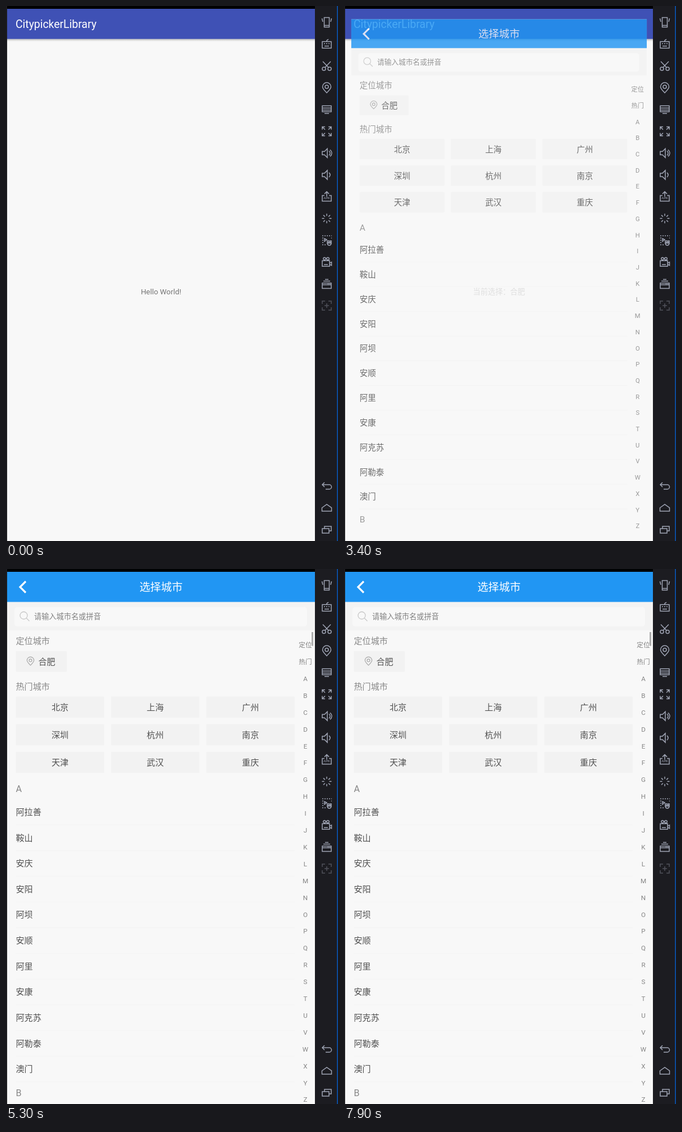
Animation, 590 px wide and 950 px high, one loop 8000 ms. Source, as an HTML page with a canvas:

```html
<!DOCTYPE html>
<html lang="zh-CN">
<head>
<meta charset="utf-8">
<title>CitypickerLibrary</title>
<style>
  html, body { margin: 0; width: 100%; height: 100%; overflow: hidden; background: #1c1c20; }
  canvas { display: block; }
</style>
</head>
<body>
<canvas id="stage" width="590" height="950"></canvas>
<script>
const LOOP = 8000, STEP = 100;
const SANS = "Roboto, 'Noto Sans CJK SC', 'Noto Sans CJK', sans-serif";
const SANS_CENTERED = "Roboto, 'Noto Sans CJK JP', 'Noto Sans CJK', sans-serif"; // centred full-width colon

const stage = document.getElementById('stage').getContext('2d');
const layerCanvas = Object.assign(document.createElement('canvas'), { width: 590, height: 950 });
const layer = layerCanvas.getContext('2d');

// Each entry: start time and how far the picker is open at every following step.
const transitions = [
  [0, [0]],
  [1700, [.3, .86, .99, 1]],
  [3400, [.8, .4, .1, 0]],
  [4800, [.06, .5, .86, .99, 1]],
  [6300, [.62, .22, .035]],
  [7500, [.5, .92, 1]]
];
const caretTimes = [[1700, 2200], [2600, 3100], [4800, 5300], [5800, 6300], [7500, 7900]];

const hotCities = ['北京', '上海', '广州', '深圳', '杭州', '南京', '天津', '武汉', '重庆'];
const cities = ['阿拉善', '鞍山', '安庆', '安阳', '阿坝', '安顺', '阿里', '安康', '阿克苏', '阿勒泰', '澳门'];
const indexLabels = ['定位', '热门', ...'ABCDEFGHIJKLMNOPQRSTUVWXYZ'];

const ring = (x, y, r) => `M${x - r} ${y}a${r} ${r} 0 1 0 ${2 * r} 0a${r} ${r} 0 1 0 ${-2 * r} 0`;
const pin = 'M0 9C-4 5-7.5 2-7.5-1.5A7.5 7.5 0 0 1 7.5-1.5C7.5 2 4 5 0 9z' + ring(0, -1.5, 3);
const speaker = 'M-8-3h4l5-5v16l-5-5h-4z M4-4q4 4 0 8';
const rays = Array.from({ length: 8 }, (_, i) => {
  const c = Math.cos(i * Math.PI / 4), s = Math.sin(i * Math.PI / 4);
  return `M${c * 4.5} ${s * 4.5}L${c * 8.5} ${s * 8.5}`;
}).join('');

const toolIcons = [
  'M-4.5-8.5h9v17h-9z M-4.5 5.5h9 M-8.5-7l1.5 6 M8.5-7l-1.5 6',
  'M-8-4.5h16v11.5h-16z M0-4.5v-2l3-2 M-5-1h2 M-1-1h2 M3-1h2 M-4 3.5h8',
  ring(-5, 5, 3) + ring(5, 5, 3) + 'M-3 2.5L7-8 M3 2.5L-7-8',
  pin,
  'M-8-6.5h16v10.5h-16z M-8-2.5h16 M-8 1h16 M-4 7h8',
  'M-8-3v-5h5 M-8-8l5 5 M8-3v-5h-5 M8-8l-5 5 M-8 3v5h5 M-8 8l5-5 M8 3v5h-5 M8 8l-5-5',
  speaker + 'M6-6q6 6 0 12',
  speaker,
  'M-4-2h-4v10h16v-10h-4 M0 0v-9 M-4-5l4-4 4 4',
  rays,
  'M-8-8h2m2 0h2m2 0h2m2 0h2m2 0h1 M-8-4h2 M-8 0h2 M-8 4h2 M-8 8h2m2 0h2 M8-4h1 M-4-3l4 2-4 3z M1 1h3v3h-3z M6 1h2v3h-2z M1 5h7v1q-1 3-3.5 3t-3.5-3z',
  ring(-4, -6, 2.2) + ring(2, -6, 2.2) + 'M-8-2.5h13v10h-13z M-5 4.5h7 M5 2l3.5-2v6l-3.5-2',
  'M-3-8h6 M-6-5h12 M-8-1.5h16v9.5h-16z M-8 1.5h16 M2 0h1 M5 0h1',
  'M-8-3v-5h5 M8-3v-5h-5 M-8 3v5h5 M8 3v5h-5 M0-4v8 M-4 0h8'
];
const navIcons = [
  'M-4-6l-4 4 4 4 M-8-2h12.5a4 4 0 0 1 0 8h-6.5',
  'M-8.5 0l8.5-6 8.5 6v6h-17z',
  'M-8-2h12v8h-12z M-4-2v-4h12v8h-4'
];

function box(ctx, x, y, w, h, color, radius = 0) {
  ctx.fillStyle = color;
  ctx.beginPath();
  ctx.roundRect(x, y, w, h, radius);
  ctx.fill();
}

// y is the vertical centre of the glyphs
function label(ctx, text, x, y, size, color, align = 'left', family = SANS) {
  ctx.font = `${size}px ${family}`;
  ctx.textAlign = align;
  ctx.fillStyle = color;
  ctx.fillText(text, x, y + size * .37);
}

function icon(ctx, path, x, y, color, width = 1.5, scale = 1) {
  ctx.save();
  ctx.translate(x, y);
  ctx.scale(scale, scale);
  ctx.strokeStyle = color;
  ctx.lineWidth = width;
  ctx.stroke(new Path2D(path));
  ctx.restore();
}

function drawSidebar(t) {
  const color = '#a0a5b5';
  box(stage, 549, 0, 39, 950, '#1c1c21');
  box(stage, 588, 0, 2, 950, '#0c4a9a');
  if (t >= 300 && t < 400) box(stage, 555, 130, 30, 30, '#34353d', 3);
  toolIcons.forEach((path, i) => icon(stage, path, 570, 29 + i * 38.7, i === 13 ? '#50525b' : color));
  label(stage, 'APK', 570, 341, 6, color, 'center');
  navIcons.forEach((path, i) => icon(stage, path, 570, 852 + i * 39, color));
}

function drawMain(t) {
  box(stage, 2, 5, 547, 945, '#f8f8f8');
  const shadow = stage.createLinearGradient(0, 58, 0, 63);
  shadow.addColorStop(0, 'rgba(0,0,0,.25)');
  shadow.addColorStop(1, 'rgba(0,0,0,0)');
  box(stage, 2, 58, 547, 5, shadow);
  box(stage, 2, 5, 547, 53.5, '#3f51b5');
  label(stage, 'CitypickerLibrary', 17, 32, 19.4, '#fff');
  if (t < 3400) label(stage, 'Hello World!', 275.5, 507, 13.3, '#757575', 'center');
  else label(stage, '当前选择：' + (t < 6300 ? '合肥' : '北京'), 275.5, 507, 13.2, '#757575', 'center', SANS_CENTERED);
}

function drawPicker(ctx, caretOn, scrollbarAlpha) {
  box(ctx, 2, 5, 547, 950, '#f8f8f8');
  box(ctx, 2, 58, 547, 51, '#f3f3f3');
  box(ctx, 2, 5, 547, 53.5, '#2196f3');
  icon(ctx, 'M5-10L-5 0 5 10', 30, 32, '#fff', 3.2);
  label(ctx, '选择城市', 275.5, 32, 19.2, '#fff', 'center');

  box(ctx, 15, 67.5, 520, 34.5, '#f8f8f8', 5);
  icon(ctx, ring(-1.5, -1.5, 6.5) + 'M3 3L8.5 8.5', 33, 84, '#c8c8c8', 1.3);
  label(ctx, '请输入城市名或拼音', 50, 84.5, 13.2, '#808080');
  if (caretOn) box(ctx, 50, 74, 2, 19, '#3a8ee8');

  label(ctx, '定位城市', 17.5, 127.5, 15.1, '#888');
  box(ctx, 17.5, 146, 90.5, 36.5, '#f2f2f2', 1);
  icon(ctx, pin, 43.5, 163.5, '#a5a5a5', 1.4, .82);
  label(ctx, '合肥', 57.5, 164.5, 15.1, '#555');

  label(ctx, '热门城市', 17.5, 208.5, 15.1, '#888');
  hotCities.forEach((city, i) => {
    const x = 17.5 + (i % 3) * 169.2, y = 226.5 + Math.floor(i / 3) * 49.1;
    box(ctx, x, y, 157, 37.5, '#f2f2f2', 1);
    label(ctx, city, x + 78.5, y + 19, 15.1, '#505050', 'center');
  });

  label(ctx, 'A', 17.5, 390, 16.2, '#888');
  cities.forEach((city, i) => {
    const y = 431.3 + i * 45.65;
    label(ctx, city, 17.5, y, 15.1, '#505050');
    box(ctx, 17.5, y + 22.5, 496, 1, '#f4f4f4');
  });
  label(ctx, 'B', 17.5, 930, 16.2, '#888');

  indexLabels.forEach((name, i) =>
    label(ctx, name, 532, 134.8 + i * 29.9, 11.7, '#858585', 'center'));
  box(ctx, 543, 112, 3, 24.5, `rgba(130,130,130,${.62 * scrollbarAlpha})`);
}

function drawPickerLayer(t, progress) {
  const scale = .8 + .2 * progress;
  const fadeStart = t < 3800 ? 2600 : t < 7000 ? 5800 : LOOP;
  const scrollbarAlpha = Math.min(1, Math.max(0, 1 - (t - fadeStart + STEP) / 400));
  const caretOn = caretTimes.some(([from, to]) => t >= from && t < to);

  layer.clearRect(0, 0, 590, 950);
  layer.save();
  layer.translate(275.5, 467);
  layer.scale(scale, scale);
  layer.translate(-275.5, -467);
  drawPicker(layer, caretOn, scrollbarAlpha);
  layer.restore();

  stage.save();
  stage.beginPath();
  stage.rect(2, 5, 547, 945);
  stage.clip();
  stage.globalAlpha = Math.min(1, progress * 1.02);
  stage.drawImage(layerCanvas, 0, 0);
  stage.restore();
}

function draw(t) {
  const [start, steps] = transitions.findLast(([from]) => t >= from);
  const progress = steps[Math.min(steps.length - 1, (t - start) / STEP)];
  const opening = steps.at(-1) === 1;

  box(stage, 0, 0, 590, 950, '#1c1c20');
  box(stage, 2, 0, 547, 5, '#000');
  drawMain(t);
  if (opening) box(stage, 2, 5, 547, 945, 'rgba(0,0,0,.03)');
  if (progress > 0) drawPickerLayer(t, progress);
  drawSidebar(t);
}

let shown = -1;
function tick() {
  const t = Math.floor((performance.now() % LOOP) / STEP) * STEP;
  if (t !== shown) draw(shown = t);
  requestAnimationFrame(tick);
}
tick();
</script>
</body>
</html>
```
